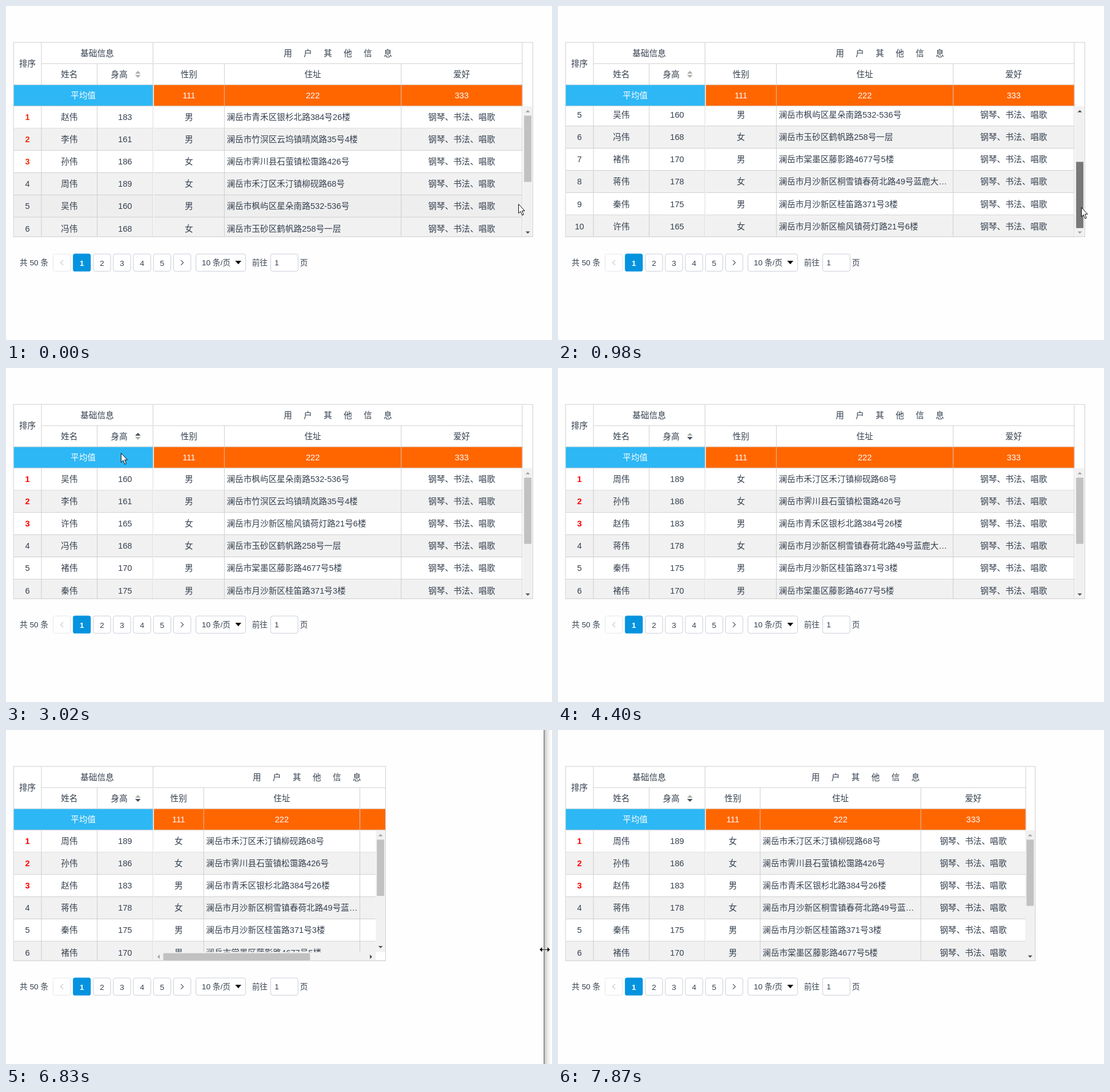
An HTML page that plays this animation: 956 by 586 pixels, repeating every 8 s.

```html
<!DOCTYPE html>
<html lang="zh-CN">
<head>
<meta charset="utf-8">
<title>表格</title>
<style>
html, body { margin: 0; width: 100%; height: 100%; overflow: hidden; background: #fefefe; }
#stage { position: absolute; left: 0; top: 0; width: 979px; height: 600px; overflow: hidden;
  transform: scale(.97656); transform-origin: 0 0;
  font: 15px "Liberation Sans", "Noto Sans CJK SC", "Noto Sans CJK", sans-serif; color: #35404f; }
#stage div { position: absolute; box-sizing: border-box; white-space: nowrap; overflow: hidden; text-align: center; }
#stage svg { position: absolute; left: 0; top: 0; }
#stage .cell { border: solid #ccc; border-width: 0 1px 1px 0; }
#stage .blue { background: #2db7f5; color: #fff; }
#stage .orange { background: #f60; color: #fff; }
#stage .address { text-align: left; padding: 0 1px 0 3.7px; text-overflow: ellipsis; }
#stage .rank { font-weight: bold; }
#stage .pager { font-size: 14px; }
#stage .button { border: 1px solid #c9cdd6; border-radius: 4px; background: #fff; }
#stage .off { border-color: #e3e6ec; }
#stage .on { border: 0; background: #0593df; }
</style>
</head>
<body>
<div id="stage"></div>
<script>
const LOOP = 8000, ROW = 40, TOP = 180, HEIGHT = 236, BOTTOM = 415;
const LEFT = 14, SPLIT = 265, BAR = 17, MIN_COLS = [90, 280, 180];

const people = [
  ['赵伟', 183, '男', '澜岳市青禾区银杉北路384号26楼'],
  ['李伟', 161, '男', '澜岳市竹溟区云坞镇晴岚路35号4楼'],
  ['孙伟', 186, '女', '澜岳市霁川县石萤镇松霭路426号'],
  ['周伟', 189, '女', '澜岳市禾汀区禾汀镇柳砚路68号'],
  ['吴伟', 160, '男', '澜岳市枫屿区星朵南路532-536号'],
  ['冯伟', 168, '女', '澜岳市玉砂区鹤帆路258号一层'],
  ['褚伟', 170, '男', '澜岳市棠墨区藤影路4677号5楼'],
  ['蒋伟', 178, '女', '澜岳市月沙新区桐雪镇春荷北路49号蓝鹿大厦三层'],
  ['秦伟', 175, '男', '澜岳市月沙新区桂笛路371号3楼'],
  ['许伟', 165, '女', '澜岳市月沙新区榆风镇荷灯路21号6楼']
];

// Each step overrides part of the state before it.
const steps = [
  [0, { right: 945, scroll: 0, sort: 0, thumb: '#c1c1c1', hover: 4, red: '#f42a00', cursor: [918.5, 355.5] }],
  [330, { hover: -1, thumb: '#a8a8a8', cursor: [939, 277.5] }],
  [630, { scroll: 96, thumb: '#787878', red: '#f00', cursor: [939, 325.5] }],
  [980, { scroll: 164, cursor: [938, 361.5] }],
  [1310, { scroll: 80, cursor: [943, 317.5] }],
  [1660, { scroll: 0, cursor: [943, 246.5] }],
  [2010, { thumb: '#c1c1c1', cursor: [380, 219] }],
  [2340, { cursor: [183.5, 143.5] }],
  [2690, { cursor: [194.5, 125] }],
  [3020, { sort: 1, cursor: [206, 152.5] }],
  [3370, { cursor: [198.5, 127] }],
  [3720, { cursor: [204, 123] }],
  [4050, { sort: -1, cursor: null }],
  [6120, { right: 851 }],
  [6480, { right: 763, resize: 974 }],
  [6830, { right: 681, resize: 966, edge: true }],
  [7150, { right: 717, resize: 0, edge: false }],
  [7520, { right: 787 }],
  [7870, { right: 856 }]
];
let state = {};
const states = steps.map(([, change]) => state = { ...state, ...change });

const box = (x, y, w, h, body = '', cls = '', css = '') =>
  `<div class="${cls}" style="left:${x}px;top:${y}px;width:${w}px;height:${h}px;line-height:${h}px;${css}">${body}</div>`;
const fill = (x, y, w, h, color) => box(x, y, w, h, '', '', `background:${color}`);
const svg = body => `<svg width="979" height="600">${body}</svg>`;
const shape = (d, color, extra = '') => `<path d="${d}" fill="${color}" ${extra}/>`;
const arrowColor = active => active ? '#505050' : '#a3a3a3';

// Triangles centred on x, y; sign tells which way they point.
const vertical = (x, y, sign, w, h, color) =>
  shape(`M${x - w} ${y - sign * h / 2}h${2 * w}l${-w} ${sign * h}z`, color);
const horizontal = (x, y, sign, color) =>
  shape(`M${x - sign * 2} ${y - 4}v8l${sign * 4} -4z`, color);

// Spare width is shared equally; below the minimum the pane scrolls sideways.
function layout(right) {
  const view = right - 1 - BAR - SPLIT;
  const extra = Math.max(0, Math.round((view - 550) / 3));
  const [a, b, c] = MIN_COLS.map(w => w + extra);
  return { a, b, c, view, total: a + b + c, wide: view < 550 };
}

function header(s, { a, b, c, total }) {
  const title = [...'用户其他信息'].join('&nbsp;'.repeat(5));
  const right = box(0, 0, total, 38, title, 'cell') +
    [['性别', 111, 0, a], ['住址', 222, a, b], ['爱好', 333, a + b, c]].map(([name, mean, x, w]) =>
      box(x, 38, w, 38, name, 'cell') + box(x, 76, w, 38, mean, 'cell orange')).join('');
  return box(LEFT, 66, 50, 76, '排序', 'cell') +
    box(64, 66, 200, 38, '基础信息', 'cell') +
    box(64, 104, 100, 38, '姓名', 'cell') +
    box(164, 104, 100, 38, '', 'cell') + box(164, 104, 78, 38, '身高') +
    box(LEFT, 142, 250, 38, '平均值', 'cell blue') +
    box(SPLIT, 66, s.right - 1 - SPLIT, 114, right) +
    svg(vertical(236.5, 119, -1, 5, 5, s.sort > 0 ? '#46505e' : '#aab0a8') +
      vertical(236.5, 126.5, 1, 5, 5, s.sort < 0 ? '#46505e' : '#aab0a8'));
}

function body(s, { a, b, c, view, total, wide }) {
  const height = HEIGHT - (wide ? BAR : 0);
  const list = s.sort ? [...people].sort((p, q) => s.sort * (p[1] - q[1])) : people;
  let left = '', right = '';
  list.forEach(([name, tall, sex, address], i) => {
    const y = i * ROW - s.scroll;
    const back = `background:${i === s.hover ? '#eee' : i % 2 ? '#f1f1f1' : '#fff'}`;
    const cell = (x, w, text, cls = '', css = '') => box(x, 0, w, ROW, text, 'cell ' + cls, css);
    left += box(0, y, 250, ROW,
      cell(0, 50, i + 1, i < 3 ? 'rank' : '', i < 3 ? `color:${s.red}` : '') +
      cell(50, 100, name) + cell(150, 100, tall), '', back);
    right += box(0, y, total, ROW,
      cell(0, a, sex) + cell(a, b, address, 'address') + cell(a + b, c, '钢琴、书法、唱歌'), '', back);
  });

  const x = SPLIT + view, full = ROW * people.length, max = full - height;
  const track = height - 2 * BAR, size = track * height / full;
  let bars = fill(x, TOP, BAR, height, '#f1f1f1') +
    fill(x + 2, TOP + BAR + s.scroll / max * (track - size), 13, size, s.thumb);
  let arrows = vertical(x + 8.5, TOP + 9, -1, 4, 4, arrowColor(s.scroll > 0)) +
    vertical(x + 8.5, TOP + height - 9, 1, 4, 4, arrowColor(s.scroll < max));
  if (wide) {
    const y = TOP + height;
    bars += fill(SPLIT, y, view, BAR, '#f1f1f1') +
      fill(SPLIT + BAR, y + 2, (view - 2 * BAR) * view / total, 13, '#c1c1c1');
    arrows += horizontal(SPLIT + 8.5, y + 8.5, -1, arrowColor(false)) +
      horizontal(x - 8.5, y + 8.5, 1, arrowColor(true));
  }
  return box(LEFT, TOP, 250, BOTTOM - TOP, left) +
    box(SPLIT, TOP, view, Math.min(height, BOTTOM - TOP), right) + bars + svg(arrows) +
    fill(13, BOTTOM, s.right - 13, 2, '#fefefe') + fill(13, BOTTOM - 1, s.right - 13, 1, '#ccc');
}

function pager() {
  const y = 445;
  const text = (x, w, t) => box(x, y, w, 32, t, 'pager', 'text-align:left');
  const button = (x, w, cls = '') => box(x, y, w, 32, '', 'button ' + cls);
  const line = (d, color) => shape(d, 'none', `stroke="${color}" stroke-width="1.2"`);
  let html = text(24.5, 56, '共 50 条');
  for (let i = 0; i < 7; i++) {
    const x = 84 + i * 36;
    html += button(x, 32, ['off', 'on'][i]);
    if (i > 0 && i < 6) html += box(x, y + 1, 32, 32, i, 'pager', i === 1 ? 'color:#fff;font-weight:bold' : '');
  }
  return html + button(340, 90) + text(351, 60, '10 条/页') +
    text(441, 30, '前往') + button(474, 50) + text(481.5, 20, '1') + text(527, 20, '页') +
    svg(line('M102.5 456.5l-4.5 4.5 4.5 4.5', '#c0c4cc') + line('M313.5 456.5l4.5 4.5 -4.5 4.5', '#46505e') +
      vertical(416.5, 461, 1, 5.5, 6.5, '#111'));
}

function pointer(s) {
  let html = '', marks = '';
  if (s.edge) html += box(964, 0, 15, 600, '', '',
    'background:linear-gradient(90deg,#808080 0 1.5px,#c8c8c8 2px,#e6e6e6 6px,#fefefe 13px)');
  if (s.cursor) marks += shape('M.5 .5V17L4.2 13.5L7 20.5L9.5 19.3L6.8 12.5H11.5Z', '#fff',
    `stroke="#000" transform="translate(${s.cursor})"`);
  if (s.resize) marks += shape('M-9.5 0l5 -5v4h9v-4l5 5l-5 5v-4h-9v4z', '#000',
    `stroke="#fff" stroke-width=".8" transform="translate(${s.resize} 394.5)"`);
  return html + svg(marks);
}

const stage = document.getElementById('stage');
let shown = -1;
function frame() {
  const t = performance.now() % LOOP;
  const now = steps.filter(([start]) => start <= t).length - 1;
  if (now !== shown) {
    const s = states[shown = now], size = layout(s.right);
    stage.innerHTML = box(13, 65, s.right - 13, 350, '', '', 'border:1px solid #ccc;background:#fff') +
      header(s, size) + body(s, size) + pager() + pointer(s);
  }
  requestAnimationFrame(frame);
}
frame();
</script>
</body>
</html>
```
